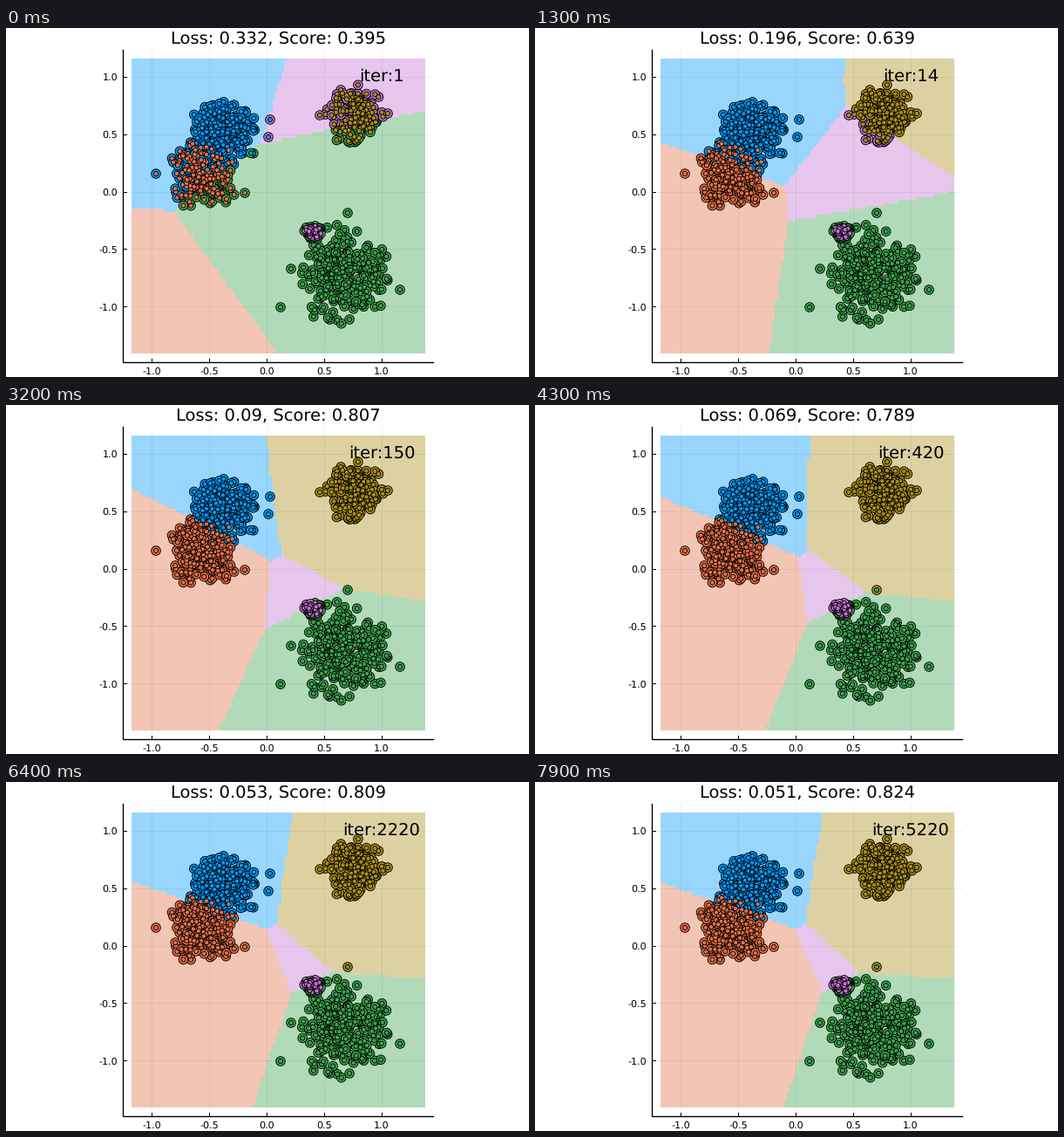
Recreate the animation shown at these times as a matplotlib script. Size 600 px wide and 400 px high, loop 8 s.

```python
import numpy as np
import matplotlib.pyplot as plt
from matplotlib.animation import FuncAnimation
from matplotlib.colors import to_rgb
from matplotlib.path import Path

plt.rcParams["font.family"] = "DejaVu Sans"
plt.rcParams["text.hinting"] = "none"

GREEN, ORANGE, BLUE, PURPLE, GOLD = 2, 1, 0, 3, 4
PALETTE = np.array([to_rgb(c) for c in
                    ("#009AFA", "#E36F47", "#3EA44E", "#C371D2", "#AC8E18")])
PALE = 0.4 * PALETTE + 0.6
LEFT, RIGHT, TOP, BOTTOM = 143.8, 480.4, 35.2, 373
UNIT, X0, Y0 = 131.9, 299.1, 187.5
CELLS = 100
FRAMES = 80

fig = plt.figure(figsize=(6, 4), dpi=100, facecolor="white")
ax = fig.add_axes([0, 0, 1, 1])
ax.set_axis_off()


def layout(edges, b, c, ab, de):
    """Where borders cross the left, top, right and bottom sides, the two
    gold junctions, and the orange-side and purple-side pairs of junctions."""
    return np.array([*edges, *b, *c, *np.ravel(ab), *np.ravel(de)], float)


def joined(edges, b, c, upper, lower):
    return layout(edges, b, c, (upper, upper), (lower, lower))


# At first blue touches green; later orange touches purple instead.
west, east = (192, 210), (292, 133)
START = layout((206, 322, 95, 312), (327, 18), (700, 51), (west, east), (west, east))
EARLY = joined((150, 385, 179, 281), (378, 47), (561, 171), (277, 182), (287, 202))
MIDDLE = joined((95, 299, 226, 243), (316, 171), (386, 210), (304, 179), (296, 258))
SETTLED = joined((115, 331, 226, 284), (311, 163), (373, 218), (298, 168), (329, 241))
STAGES = (START, EARLY, MIDDLE, SETTLED)
STAGE_TIMES = np.log([1, 8, 150, 5220])

METRIC_TIMES = np.log([1, 8, 30, 150, 420, 2220, 5220])
LOSS = (.332, .231, .149, .09, .069, .053, .051)
SCORE = (.395, .51, .814, .807, .789, .809, .824)


def step_at(frame):
    """Twenty frames for each stride: 1, 10, 50, 200."""
    strides = np.repeat([1, 10, 50, 200], 20)
    return int(strides[:frame + 1].sum())


def layout_at(step):
    """Ease out from each stage to the next, in log time."""
    stage, u = divmod(np.interp(np.log(step), STAGE_TIMES, range(4)), 1)
    i = min(int(stage), 2)
    u = stage + u - i
    return STAGES[i] + (STAGES[i + 1] - STAGES[i]) * (1 - (1 - u) ** 2)


def regions(values):
    left, top, right, bottom = values[:4]
    b, c, a1, a2, d1, d2 = values[4:].reshape(6, 2)
    bend = (b + (top, 34)) / 2 - (2, 0)
    return [
        (GREEN, [d1, a1, a2, d2, c, (482, right), (490, 400), (bottom, 400), (bottom, 374)]),
        (ORANGE, [(143, left), a1, d1, (bottom, 374), (143, 374)]),
        (BLUE, [(143, -50), (143, left), a1, a2, b, bend, (top, 34), (top, -50)]),
        (PURPLE, [a2, b, c, d2]),
    ]


def classify(points, areas):
    labels = np.full(len(points), GOLD)
    for label, outline in areas:
        closed = np.array([*outline, outline[0]])
        labels[Path(closed).contains_points(points)] = label
    return labels


rng = np.random.default_rng(7)


def cluster(n, center, spread, *strays):
    z = rng.normal(size=(2 * n, 2))
    z = z[np.hypot(*z.T) < 2.4][:n]
    return np.array([*(center + z * spread), *strays])


clusters = [
    cluster(260, (250, 120), (18, 16), (303, 105), (301, 125)),
    cluster(200, (225, 169), (19, 17), (172, 167), (274, 189)),
    cluster(210, (386, 284), (24, 25), (315, 320), (327, 276), (392, 212), (452, 300)),
    cluster(70, (352, 235), (4.5, 4.5)),
    cluster(160, (400, 98), (15, 16), (438, 98), (360, 100)),
]
points = np.vstack(clusters)
truth = np.repeat(np.arange(5), [len(c) for c in clusters])

middles = (np.arange(CELLS) + .5) / CELLS
px, py = LEFT + middles * (RIGHT - LEFT), TOP + middles * (BOTTOM - TOP)
cells = np.stack(np.meshgrid(px, py), axis=-1).reshape(-1, 2)

heat = ax.imshow(np.ones((CELLS, CELLS, 3)), extent=(LEFT, RIGHT, BOTTOM, TOP),
                 aspect="auto", interpolation="nearest", zorder=1)
ax.set_xlim(0, 600)
ax.set_ylim(400, 0)


def line(xs, ys, lw=.72, **style):
    ax.plot(xs, ys, color="black", lw=lw, **{"zorder": 3, **style})


for value in (-1, -.5, 0, .5, 1):
    x, y = X0 + value * UNIT, Y0 - value * UNIT
    line((x, x), (25, 383), lw=.5, alpha=.08, zorder=2)
    line((134, 490), (y, y), lw=.5, alpha=.08, zorder=2)
    line((x, x), (383, 379))
    line((134, 138), (y, y))
    ax.text(x, 396.5, f"{value:.1f}", size=8, ha="center", va="baseline")
    ax.text(128, y + 4, f"{value:.1f}", size=8, ha="right", va="baseline")
line((134, 134, 490), (25, 383, 383), lw=1, solid_joinstyle="miter")

outer = ax.scatter(*points.T, s=58, c=PALETTE[truth], edgecolors="black",
                   linewidths=.65, zorder=4)
ax.scatter(*points.T, s=14, c=PALETTE[truth], edgecolors="black",
           linewidths=.6, zorder=5)
title = ax.text(312.5, 17.3, "", size=14, ha="center", va="baseline")
counter = ax.text(431, 60.6, "", size=14, ha="center", va="baseline", zorder=6)


def metric(values, step):
    return round(float(np.interp(np.log(step), METRIC_TIMES, values)), 3)


def update(frame):
    step = step_at(frame)
    areas = regions(layout_at(step))
    heat.set_data(PALE[classify(cells, areas)].reshape(CELLS, CELLS, 3))
    predicted = classify(points, areas)
    order = np.argsort(predicted, kind="stable")
    outer.set_offsets(points[order])
    outer.set_facecolor(PALETTE[predicted[order]])
    title.set_text(f"Loss: {metric(LOSS, step)}, Score: {metric(SCORE, step)}")
    counter.set_text(f"iter:{step}")
    return heat, outer, title, counter


anim = FuncAnimation(fig, update, frames=FRAMES, interval=100, repeat=True)
plt.show()
```
